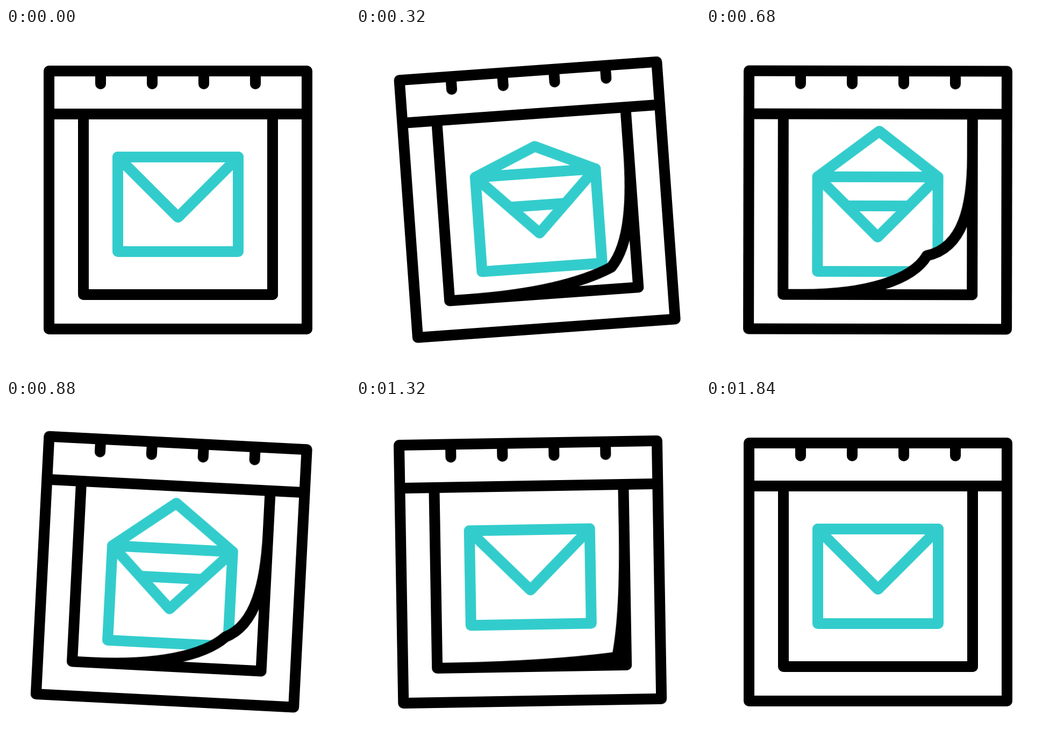
Animation, 640 px wide and 640 px high, one loop 2 s. Source, as an HTML page without scripts:

```html
<!DOCTYPE html>
<html lang="en">
<head>
<meta charset="utf-8">
<title>Mail calendar</title>
<style>
  html, body { margin: 0; width: 100%; height: 100%; overflow: hidden; background: #fff; }
  svg { display: block; width: 100vw; height: 100vh; }
  path, rect { fill: none; stroke-width: 20; stroke-linecap: round; stroke-linejoin: round; }
  .frame { stroke: #000; }
  .mail { stroke: #3cc; }
  .paper { fill: #fff; }

  .swing, .mail, .letter, .flap, .curl {
    animation: 2s cubic-bezier(.333, 0, .667, 1) infinite;
  }
  .swing { animation-name: swing; transform-origin: 320px 80px; }
  .mail { animation-name: bob; }
  .letter { animation-name: rise; }
  .flap { animation-name: open; }
  .curl { animation-name: curl; }

  @keyframes swing {
    0%, 92%, 100% { transform: rotate(0deg); }
    22% { transform: rotate(-5deg); }
    42.3% { transform: rotate(3deg); }
    64% { transform: rotate(-1deg); }
  }
  @keyframes bob {
    0%, 92%, 100% { transform: translateY(0); }
    22%, 56% { transform: translateY(37px); }
    75% { transform: translateY(-28.5px); }
  }
  @keyframes rise {
    0%, 70%, 100% { transform: translateY(0); }
    22%, 48% { transform: translateY(-38.5px); }
  }
  @keyframes open {
    0%, 64.8%, 100% { d: path("M208 240L320 352L432 240"); }
    22%, 44% { d: path("M208 240L322.6 155L432 240"); }
  }
  @keyframes curl {
    0%, 80.5%, 100% { d: path("M496 240C496 330 496 420 496 496C400 496 300 496 180 496H496Z"); }
    30% { d: path("M496 240C496 330 479 409 410 422C385 468 300 496 180 496H496Z"); }
  }
</style>
</head>
<body>
<svg viewBox="0 0 640 640">
  <clipPath id="pocket"><path d="M208 240L320 352L432 240Z"/></clipPath>

  <g class="swing">
    <g class="mail">
      <g clip-path="url(#pocket)"><path class="letter" d="M208 332H432"/></g>
      <path d="M208 240L320 352L432 240"/>
      <path class="flap paper" d="M208 240L320 352L432 240"/>
      <rect x="208" y="240" width="224" height="176"/>
    </g>

    <g class="frame">
      <!-- lifted page corner hides the envelope behind it -->
      <path class="curl paper" d="M496 240C496 330 496 420 496 496C400 496 300 496 180 496H496Z"/>
      <path d="M144 160V496H496V160"/>
      <rect x="80" y="80" width="480" height="480"/>
      <path d="M80 160H560M176 80v24M272 80v24M368 80v24M464 80v24"/>
    </g>
  </g>
</svg>
</body>
</html>
```
